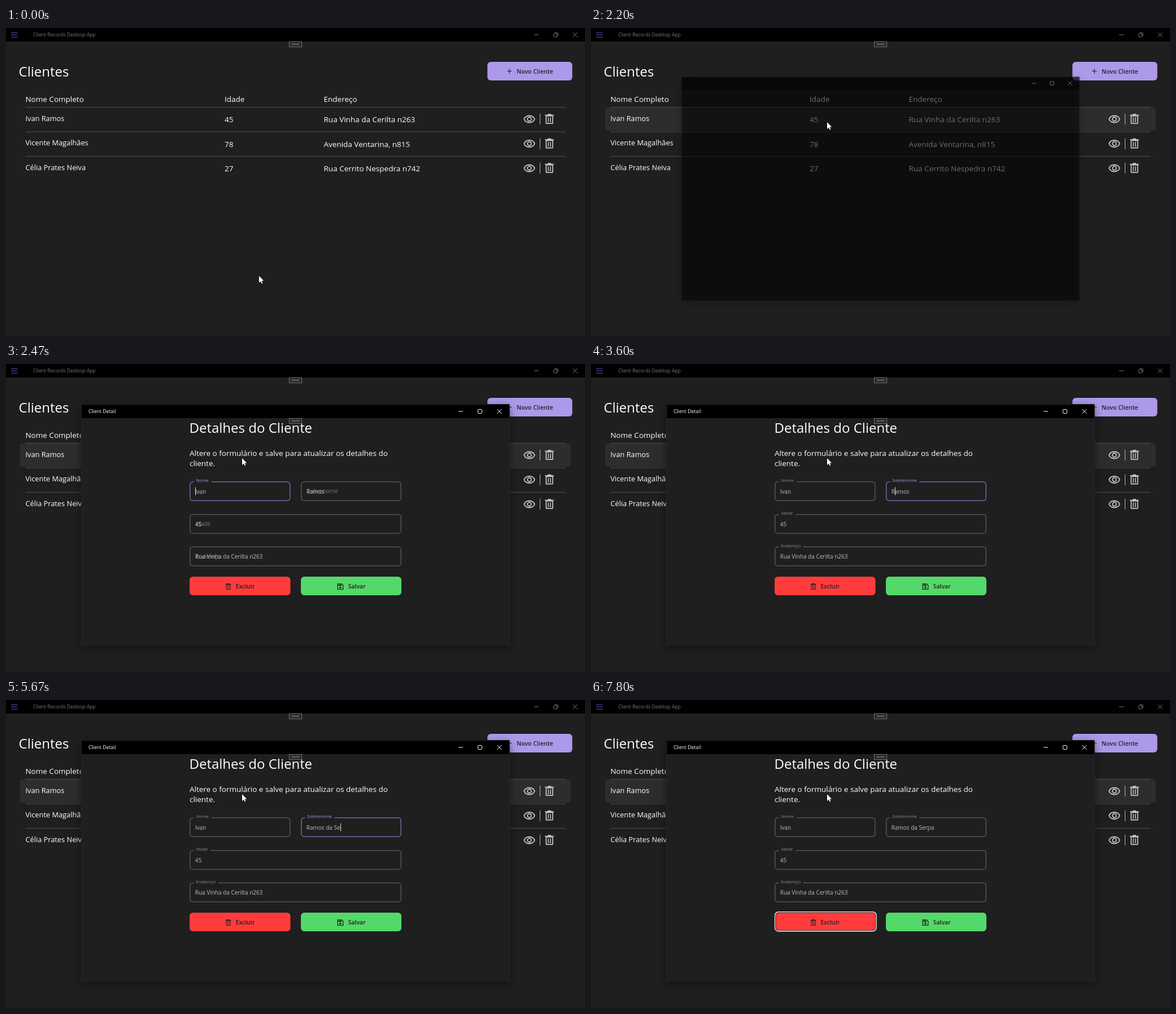
An HTML page with a canvas for the animation above (8 s loop, 1025 by 546 pixels).

```html
<!DOCTYPE html>
<html lang="pt">
<head>
<meta charset="utf-8">
<title>Client Records Desktop App</title>
<style>
html, body { margin: 0; width: 100%; height: 100%; overflow: hidden; background: #1f1f1f; }
canvas { display: block; width: 100vw; height: 100vh; }
</style>
</head>
<body>
<canvas id="stage" width="1025" height="546"></canvas>
<script>
const ctx = document.getElementById('stage').getContext('2d');
const LOOP = 8000;
const BG = '#1f1f1f', WHITE = '#fff', DIM = '#777', INK = '#222', PURPLE = '#ac99ea';
const FAMILY = '"Open Sans", "Noto Sans", sans-serif';

const clients = [
  ['Ivan Ramos', '45', 'Rua Vinha da Cerilta n263'],
  ['Vicente Magalhães', '78', 'Avenida Ventarina, n815'],
  ['Célia Prates Neiva', '27', 'Rua Cerrito Nespedra n742']
];
const fields = [
  { label: 'Nome', value: 'Ivan', x: 325, y: 208, w: 178.5 },
  { label: 'Sobrenome', value: 'Ramos da Serpa', x: 522, y: 208, w: 178 },
  { label: 'Idade', value: '45', x: 325, y: 266, w: 375 },
  { label: 'Endereço', value: clients[0][2], x: 325, y: 323.5, w: 375 }
];
// [time, focused control]
const focusSteps = [[0, 0], [3000, 1], [6600, 2], [7330, 3], [7800, 4]];
// [time, caret position in the surname]
const caretSteps = [[0, 0], [3600, 1], [4070, 2], [4130, 3], [4200, 5], [4670, 6], [5000, 7],
  [5130, 8], [5270, 9], [5470, 10], [5670, 11], [5730, 12], [5930, 14]];
// [time, scale, opacity] of the opening dialog
const openSteps = [[0, 1, 0], [2130, 0.88, 0.12], [2200, 0.93, 0.45], [2270, 0.97, 0.8],
  [2330, 0.99, 0.96], [2400, 1, 1]];

const at = (steps, t) => steps.filter(s => s[0] <= t).pop();

function text(str, x, y, size, color = WHITE, weight = 400) {
  ctx.font = `${weight} ${size}px ${FAMILY}`;
  ctx.fillStyle = color;
  ctx.fillText(str, x, y);
}

function textWidth(str, size) {
  ctx.font = `400 ${size}px ${FAMILY}`;
  return ctx.measureText(str).width;
}

function rect(x, y, w, h, color) {
  ctx.fillStyle = color;
  ctx.fillRect(x, y, w, h);
}

function round(x, y, w, h, r) {
  ctx.beginPath();
  ctx.roundRect(x, y, w, h, r);
}

function fillRound(x, y, w, h, r, color) {
  round(x, y, w, h, r);
  ctx.fillStyle = color;
  ctx.fill();
}

function strokeRound(x, y, w, h, r, color, width = 1) {
  round(x, y, w, h, r);
  ctx.strokeStyle = color;
  ctx.lineWidth = width;
  ctx.stroke();
}

function lines(color, width, ...segments) {
  ctx.beginPath();
  for (const [x1, y1, x2, y2] of segments) {
    ctx.moveTo(x1, y1);
    ctx.lineTo(x2, y2);
  }
  ctx.strokeStyle = color;
  ctx.lineWidth = width;
  ctx.stroke();
}

function grip(y) {
  rect(501, y, 23, 9.75, '#242424');
  strokeRound(501.4, y + 0.4, 22.2, 9, 0, '#808080', 0.9);
  rect(505, y + 3.2, 15, 3.2, '#555');
}

function captionButtons(right, y, color, restored) {
  const mid = right - 39;
  lines(color, 1, [right - 77, y, right - 69, y],
    [right - 8.5, y - 4, right - 0.5, y + 4], [right - 0.5, y - 4, right - 8.5, y + 4]);
  if (restored) {
    strokeRound(mid - 3.5, y - 2.2, 6, 6, 1, color);
    ctx.beginPath();
    ctx.moveTo(mid - 1.5, y - 3.8);
    ctx.lineTo(mid + 2.2, y - 3.8);
    ctx.quadraticCurveTo(mid + 4.2, y - 3.8, mid + 4.2, y - 1.8);
    ctx.lineTo(mid + 4.2, y + 2);
    ctx.stroke();
  } else {
    strokeRound(mid - 3.5, y - 3.5, 7, 7, 1, color);
  }
}

function trash(x, y, s, color) {
  ctx.save();
  ctx.translate(x, y);
  ctx.scale(s, s);
  strokeRound(2.2, 4, 11.6, 13.2, 0.8, color, 1.7);
  lines(color, 1.7, [0, 2.7, 16, 2.7], [5, 1, 11, 1]);
  lines(color, 1.5, [6.1, 6.5, 6.1, 15], [9.9, 6.5, 9.9, 15]);
  ctx.restore();
}

function eye(x, y) {
  ctx.beginPath();
  ctx.moveTo(x - 9.4, y);
  ctx.bezierCurveTo(x - 6, y - 8, x + 6, y - 8, x + 9.4, y);
  ctx.bezierCurveTo(x + 6, y + 8, x - 6, y + 8, x - 9.4, y);
  ctx.closePath();
  ctx.strokeStyle = '#c8c8c8';
  ctx.lineWidth = 1.8;
  ctx.stroke();
  ctx.beginPath();
  ctx.arc(x, y, 3.4, 0, 7);
  ctx.stroke();
}

function saveIcon(x, y) {
  ctx.beginPath();
  ctx.moveTo(x + 0.7, y + 0.7);
  ctx.lineTo(x + 7.8, y + 0.7);
  ctx.lineTo(x + 10.3, y + 3.2);
  ctx.lineTo(x + 10.3, y + 10.3);
  ctx.lineTo(x + 0.7, y + 10.3);
  ctx.closePath();
  ctx.strokeStyle = INK;
  ctx.lineWidth = 1.3;
  ctx.stroke();
  rect(x + 2, y + 2, 5.5, 2.3, INK);
  ctx.beginPath();
  ctx.arc(x + 5.5, y + 7.2, 1.7, 0, 7);
  ctx.fill();
}

function mainWindow(t) {
  rect(0, 0, 1025, 546, BG);
  rect(0, 0, 1025, 24, '#000');
  lines('#6353ba', 1, [9, 8.2, 20.6, 8.2], [9, 12.1, 20.6, 12.1], [9, 16, 20.6, 16]);
  text('Client Records Desktop App', 48, 15, 8.6, DIM);
  captionButtons(1012, 12, t >= 1870 && t < 2130 ? WHITE : DIM, true);
  grip(24);

  text('Clientes', 22.5, 86, 24);
  fillRound(852.25, 60, 150.25, 33, 6, PURPLE);
  lines(INK, 1.2, [887, 76.5, 895.5, 76.5], [891.2, 72.3, 891.2, 80.7]);
  text('Novo Cliente', 904, 80.8, 10.5, INK, 600);

  if (t >= 1530) fillRound(25, 141, 974.5, 41, 3, '#2d2d2d');
  text('Nome Completo', 34.4, 131, 13.5);
  text('Idade', 387, 131, 13.5);
  text('Endereço', 562.5, 131, 13.5);
  clients.forEach(([name, age, address], i) => {
    const y = i * 43.5;
    rect(34.5, 140.1 + y, 956, 0.8, '#5c5c5c');
    text(name, 34.4, 164.7 + y, 12.8);
    text(age, 387, 167 + y, 13.5);
    text(address, 562.5, 167 + y, 13.5);
    eye(926.5, 161.5 + y);
    rect(945.2, 152 + y, 0.8, 19, '#ddd');
    trash(954, 152 + y, 1, '#c8c8c8');
  });
}

function field(f, focused, floated, value, caret) {
  const { x, y, w, label } = f;
  const color = focused ? '#7465ab' : '#555';
  strokeRound(x + 0.75, y + 0.75, w - 1.5, 33.5, 5, color, 1.5);
  if (floated) {
    rect(x + 7.5, y - 1, textWidth(label, 8) + 8.5, 3, BG);
    text(label, x + 11.3, y + 1.3, 8, focused ? PURPLE : '#8c8c8c');
  } else {
    text(label, x + 11, y + 21.3, 10, '#777');
  }
  text(value, x + 9.7, y + 21.6, 10, '#bdbdbd');
  if (focused) {
    const cx = x + 9.8 + textWidth(value.slice(0, caret), 10);
    rect(Math.round(cx), y + 10.5, 1, 14, '#ddd');
  }
}

function actionButtons(focused) {
  if (focused) {
    strokeRound(325.7, 375.7, 179.3, 34, 6, WHITE, 1.5);
    strokeRound(326.9, 376.9, 176.9, 31.6, 5, INK);
    fillRound(327.3, 377.3, 176.2, 31, 5, '#ff3c3b');
  } else {
    fillRound(325, 377, 178.5, 33, 6, '#ff3c3b');
  }
  trash(388.6, 388.6, 0.63, INK);
  text('Excluir', 406.5, 398, 10.5, INK, 600);
  fillRound(522, 377, 178, 33, 6, '#53d96a');
  saveIcon(586.5, 389);
  text('Salvar', 605.7, 398, 10.5, INK, 600);
}

function dialog(t) {
  const [, scale, alpha] = at(openSteps, t);
  if (!alpha) return;
  const ready = t >= 2470;
  const focus = at(focusSteps, t)[1];
  const pos = at(caretSteps, t)[1];

  ctx.save();
  ctx.globalAlpha = alpha;
  ctx.translate(512.5, 285);
  ctx.scale(scale, scale);
  ctx.translate(-512.5, -285);
  ctx.save();
  ctx.shadowColor = 'rgba(0,0,0,.5)';
  ctx.shadowBlur = 14;
  ctx.shadowOffsetY = 4;
  rect(134, 72, 757, 426.5, ready ? BG : '#000');
  ctx.restore();
  strokeRound(133.5, 71.5, 758, 427.5, 1, '#262626');
  rect(134, 72, 757, 24, '#000');
  captionButtons(878, 84, WHITE, false);

  if (ready) {
    text('Client Detail', 146, 87, 8.6);
    text('Detalhes do Cliente', 324.5, 122.3, 24);
    grip(96);
    text('Altere o formulário e salve para atualizar os detalhes do', 325, 162.8, 13.5);
    text('cliente.', 325, 181.2, 13.5);
    fields.forEach((f, i) => {
      const surname = i === 1;
      const value = surname ? f.value.slice(0, Math.max(5, pos)) : f.value;
      field(f, i === focus, i === 0 || t >= 2530, value, surname ? pos : 0);
    });
    actionButtons(focus === 4);
  }
  ctx.restore();
}

function pointerAt(t) {
  if (t < 670) return [448, 439.5];
  if (t < 1530) {
    const u = Math.min(13, Math.floor((t - 670) / 66.6) + 1) / 13, v = 1 - u;
    return [v * v * 448 + 2 * u * v * 278 + u * u * 406, 439.5 - 258 * u * u * (3 - 2 * u)];
  }
  if (t < 1600) return [413, 173];
  return t < 1670 ? [416, 170] : [418, 167];
}

function pointer(t) {
  const [x, y] = pointerAt(t);
  const shape = [[0, 0], [0, 12], [2.8, 9.4], [4.7, 13.6], [6.4, 12.8], [4.6, 8.8], [8.2, 8.6]];
  ctx.beginPath();
  shape.forEach(([dx, dy]) => ctx.lineTo(x + dx, y + dy));
  ctx.closePath();
  ctx.lineJoin = 'round';
  ctx.strokeStyle = '#111';
  ctx.lineWidth = 1;
  ctx.stroke();
  ctx.fillStyle = WHITE;
  ctx.fill();
  ctx.lineJoin = 'miter';
}

const start = performance.now();
function draw() {
  const t = (performance.now() - start) % LOOP;
  mainWindow(t);
  dialog(t);
  pointer(t);
  requestAnimationFrame(draw);
}
draw();
</script>
</body>
</html>
```
